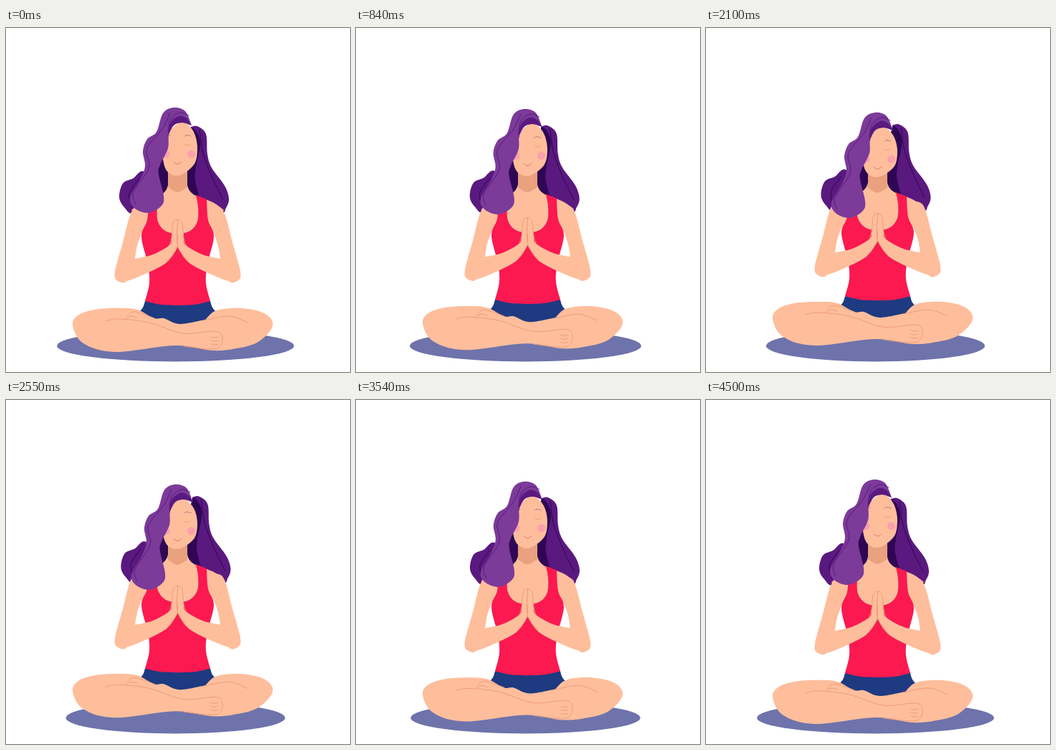
An HTML page with a canvas that plays this animation: 480x480 px, repeating every 4530 ms.

```html
<!DOCTYPE html>
<html lang="en">
<head>
<meta charset="utf-8">
<title>Breathing meditation</title>
<style>
  html, body { margin: 0; width: 100%; height: 100%; overflow: hidden; background: #fff; }
  canvas { display: block; width: 480px; height: 480px; }
</style>
</head>
<body>
<canvas id="stage" width="480" height="480"></canvas>
<script>
const ctx = document.getElementById("stage").getContext("2d");
const LOOP = 4530, AXIS = 239.5;
const SKIN = "#febe9c", SHADE = "#e9a17e", LINE = "#ee9b78", BLUSH = "#fba1ac", BROW = "#b47982";
const RED = "#fb1950", NAVY = "#1e3a80", MAT = "#6e73ab";
const HAIR = "#7c3a99", DARK = "#5a197f", DEEP = "#2f0654";

// Key points as "x,y"; "!" marks a sharp corner.
const parse = text => text.split(" ").flatMap(s => {
  const point = s.replace("!", "").split(",").map(Number);
  return s.endsWith("!") ? [point, point] : [point];
});

// Smooth curve through the key points.
function curve(pts, closed) {
  const n = pts.length;
  const at = i => closed ? pts[(i + n) % n] : pts[Math.max(0, Math.min(n - 1, i))];
  const path = new Path2D();
  path.moveTo(...pts[0]);
  for (let i = 0; i < (closed ? n : n - 1); i++) {
    const [a, b, c, d] = [at(i - 1), at(i), at(i + 1), at(i + 2)];
    if (b === c) continue;
    path.bezierCurveTo(b[0] + (c[0] - a[0]) / 6, b[1] + (c[1] - a[1]) / 6,
      c[0] - (d[0] - b[0]) / 6, c[1] - (d[1] - b[1]) / 6, c[0], c[1]);
  }
  return path;
}

function mirrorPath(path) {
  const result = new Path2D();
  result.addPath(path, new DOMMatrix([-1, 0, 0, 1, 2 * AXIS, 0]));
  return result;
}

const fill = (color, text) => ({ color, path: curve(parse(text), true) });
const line = (color, text) => ({ color, stroke: true, path: curve(parse(text)) });
const both = parts => parts.concat(parts.map(p => ({ ...p, path: mirrorPath(p.path) })));

// Closed shape built from its left half.
function symmetric(color, text) {
  const half = parse(text), flipped = new Map(half.map(p => [p, [2 * AXIS - p[0], p[1]]]));
  return { color, path: curve([...half, ...half.map(p => flipped.get(p)).reverse()], true) };
}

function oval(color, x, y, rx, ry = rx) {
  const path = new Path2D();
  path.ellipse(x, y, rx, ry, 0, 0, 7);
  return { color, path };
}

// At full breath a layer shifts by (dx, dy) and stretches by grow about y = 240.
const layers = [
  { dx: 2.5, dy: -2.5, parts: [
    fill(DARK, "194,201 177,210 163,217 158,236 165,250 180,259 222,240"),
    line(DEEP, "186,210 172,231 176,250"),
    fill(DARK, "258,138! 267,137 279,148 281,176 287,195 305,220 311,238 307,251 298,257 250,235 248,190"),
    fill(DEEP, "258,138! 266,145 271,162 265,194 264,213 270,236! 245,240 250,180"),
    line(DEEP, "270,142 275,175 289,211 303,240"),
    fill(DEEP, "212,188 229,190 229,232 212,246")
  ] },
  { dy: -4, grow: -0.02, parts: [
    symmetric(SKIN, "239.5,195! 226,195! 226,219 219,231 206,237 189,244 175,254! 200,290! 239.5,300!")
  ] },
  { dy: 1, parts: [
    fill(SHADE, "226,190! 253,190! 253,222! 239,229 226,222!")
  ] },
  { dy: -8, parts: both([
    fill(SKIN, "200,250! 185,250 174,259 163,299 152,340 155,352 168,353 180,322! 183,304 189,287! 198,275")
  ]) },
  { dy: -4, grow: -0.02, parts: [
    symmetric(NAVY, "239.5,380! 194,381! 191,390 184,398! 205,415! 239.5,420!"),
    symmetric(RED, "239.5,288 222,283 212,270 211,250 214,233! 199,239! 197,268 189,291 198,330 200,356 194,381! 216,386 239.5,387")
  ] },
  { dy: -8.5, parts: both([
    fill(SKIN, "180,322! 205,316 228,303 231,293 233,273 238,267 239.5,271! 239.5,306! 223,328 183,348 160,354 152,346 158,326"),
    line(LINE, "228,303 231,293 233,273 238,267 239.5,272 239.5,304 223,328")
  ]) },
  { dy: -9, parts: [
    fill(SKIN, "93,415 102,400 130,392 170,391 187,394! 207,405 220,405 242,413 278,407! 294,394 330,391 362,399 372,416 352,438 322,447 288,450 236,443 152,452 108,440"),
    line(LINE, "139,409 157,406 200,411 247,426 297,424 295,447 248,444"),
    line(LINE, "168,405 175,402 183,404"),
    line(LINE, "169,402 180,396 207,405"),
    line(LINE, "276,408 311,402 337,411"),
    ...[431, 436, 441].map(y => line(LINE, `286,${y} 291,${y + 1} 296,${y}`))
  ] },
  { dy: -0.3, grow: -0.068, parts: [
    fill(SKIN, "244,131 256,137 264,150 267,170 262,191 240,206 222,195 220,155")
  ] },
  { dy: 7, parts: [
    oval(BLUSH, 258.5, 176, 5.5),
    oval(BLUSH, 223, 176, 5.5),
    line(BROW, "249,151 253,149.5 258,151"),
    line(BROW, "226,151 229,150"),
    line(SHADE, "249,162 253,164 258,162"),
    line("#e57969", "234,187 239.5,190 245,187")
  ] },
  { dx: 2, dy: 7, parts: [
    fill(HAIR, "234,111 250,116 259,136! 246,132 233,136 227,149 226,168 215,191 213,204 220,234 217,248 199,258 180,252 173,237 188,210 194,192 191,172 197,155 210,145 219,119"),
    fill(DARK, "259,136! 252,126 241,123 229,133 226,151! 234,136 246,132"),
    line(DARK, "229,118 219,139 201,161 196,173 199,196 178,229 181,246"),
    line(DARK, "255,122 243,118 230,127 226,145")
  ] }
];

function paint({ color, stroke, path }) {
  ctx.fillStyle = ctx.strokeStyle = color;
  if (stroke) ctx.stroke(path); else ctx.fill(path);
}

function draw(now) {
  const breath = (1 - Math.cos(2 * Math.PI * now / LOOP)) / 2;
  ctx.clearRect(0, 0, 480, 480);
  paint(oval(MAT, 236.5, 443.5, 165.5 - 13 * breath, 22));
  for (const { dx = 0, dy, grow = 0, parts } of layers) {
    const stretch = grow * breath;
    ctx.setTransform(1, 0, 0, 1 + stretch, dx * breath, dy * breath - 240 * stretch);
    parts.forEach(paint);
  }
  ctx.resetTransform();
  requestAnimationFrame(draw);
}
ctx.lineCap = ctx.lineJoin = "round";
draw(performance.now());
</script>
</body>
</html>
```
